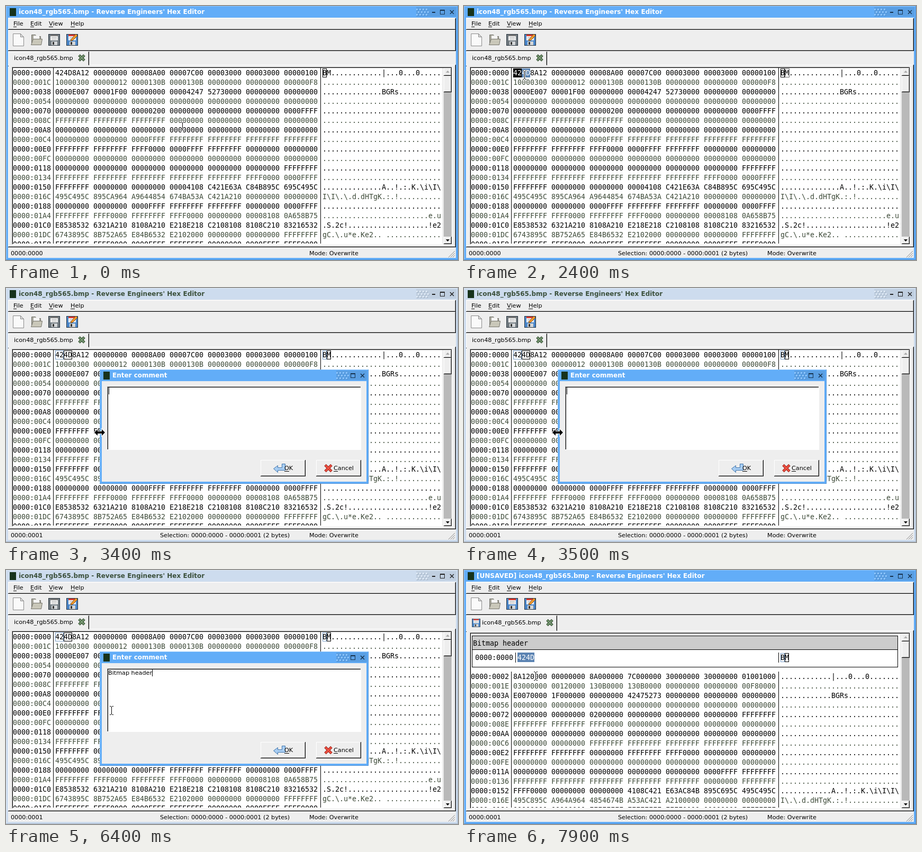
Write an HTML page with a canvas that moves like this. It is 854x480 px and loops after 8 s.

```html
<!DOCTYPE html>
<html lang="en">
<head>
<meta charset="utf-8">
<title>Hex editor</title>
<style>
html, body { margin: 0; width: 100%; height: 100%; overflow: hidden; background: #eee; }
canvas { display: block; }
</style>
</head>
<body>
<canvas id="stage" width="854" height="480"></canvas>
<script>
const g = document.getElementById('stage').getContext('2d');
const SANS = '11.2px "DejaVu Sans", sans-serif';
const BOLD = 'bold 12px "DejaVu Sans", sans-serif';
const MONO = '13.33px "DejaVu Sans Mono", monospace';
const GREY = '#eeeeee', SHADE = '#a5a5a5', SELECT = '#5b83b2';
const ACTIVE = { fill: '#62adf8', light: '#8cc4fb', dark: '#4a8fd6', shade: '#5a9fe3', text: '#fff', ink: '#17324d' };
const PASSIVE = { fill: '#cddcee', light: '#dde8f4', dark: '#a3b3c6', shade: '#c0cfe0', text: '#3b503b', ink: '#222' };

// File contents, "00*6" repeats a byte
const bytes = `
424D8A12 00*6 8A 00*3 7C 00*3 30 00*3 30 00*3 0100
100003 00*4 12 00*2 130B 00*2 130B 00*11 F8
00*2 E007 00*2 1F 00*7 42475273 00*10
00*28
00*10 02 00*15 FFFF
FF*12 00*16
00*28
00*10 FF*18
FF*10 00*4 FF*6 00*8
00*28
00*24 FF*4
FF*22 00*4 FF*2
FF*4 00*10 4108 C421E63A C84B895C 695C495C
495C495C 895CA964 A9644854 674BA53A C421A210 00*8
00*10 FF*10 00*6 FF*2
FF*6 00*2 FF*6 00*8 8108 0A658B75
E8538532 6321A210 8108A210 E218E218 C2108108 8108C210 83216532
6743895C 8B752A65 E84B6532 E21020 00*9 FF*4
FF*6 00*4 FF*6 00*6 FF*4 00*2`
  .replace(/(\w\w)\*(\d+)/g, (_, b, n) => b.repeat(n)).replace(/\s/g, '').match(/../g);

// time, x, y of the pointer
const path = [
  [100, 333, 227], [700, 98, 129], [1600, 98, 129], [1900, 114, 130], [2500, 114, 130],
  [2800, 150, 177], [3200, 177, 273], [3600, 177, 273], [4000, 199, 265], [6400, 199, 265],
  [6800, 510, 340], [7300, 510, 340], [7700, 233, 213], [7800, 118, 178], [7900, 135, 200]
];

function rect(x, y, w, h, c) { g.fillStyle = c; g.fillRect(x, y, w, h); }

function box(x, y, w, h, c) {
  g.strokeStyle = c; g.lineWidth = 1;
  g.strokeRect(x + .5, y + .5, w - 1, h - 1);
}

function poly(points, fill, stroke, width = 1) {
  g.beginPath();
  for (let i = 0; i < points.length; i += 2) g.lineTo(points[i], points[i + 1]);
  if (fill) { g.closePath(); g.fillStyle = fill; g.fill(); }
  if (stroke) { g.strokeStyle = stroke; g.lineWidth = width; g.stroke(); }
}

function text(s, x, y, c = '#000', font = SANS, align = 'left') {
  g.font = font; g.fillStyle = c; g.textAlign = align;
  g.fillText(s, x, y);
}

// One character per 8 pixel cell
function mono(s, x, y, c = '#000') {
  g.font = MONO; g.fillStyle = c; g.textAlign = 'left';
  for (let i = 0; i < s.length; i++) g.fillText(s[i], x + i * 8, y);
}

// "&" marks the underlined letter
function label(s, x, y) {
  const i = s.indexOf('&'), plain = s.replace('&', '');
  text(plain, x, y);
  if (i < 0) return;
  const left = g.measureText(plain.slice(0, i)).width;
  rect(Math.round(x + left), y + 2, Math.round(g.measureText(plain[i]).width), 1, '#000');
}

function cross(x, y, r, c, w) {
  poly([x - r, y - r, x + r, y + r], null, c, w);
  poly([x - r, y + r, x + r, y - r], null, c, w);
}

function raised(x, y, w, h) {
  rect(x, y, w, h, '#000');
  rect(x, y, w - 1, h - 1, '#fff');
  rect(x + 1, y + 1, w - 2, h - 2, SHADE);
  rect(x + 1, y + 1, w - 3, h - 3, GREY);
}

function sunken(x, y, w, h) {
  rect(x, y, w, h, '#fff');
  rect(x, y, w - 1, 1, SHADE); rect(x, y, 1, h - 1, SHADE);
  rect(x + 1, y + 1, w - 2, 1, '#000'); rect(x + 1, y + 1, 1, h - 2, '#000');
}

function groove(x, y, w) { rect(x, y, w, 1, SHADE); rect(x, y + 1, w, 1, '#fff'); }

function frame(x, y, w, h, look, title, minimise) {
  rect(x, y, w, h, look.dark);
  rect(x, y, w - 1, h - 1, look.light);
  rect(x + 1, y + 1, w - 2, h - 2, look.fill);
  rect(x + 4, y + 22, w - 8, h - 26, GREY);

  const right = x + w, mid = y + 11, dots = right - (minimise ? 79 : 61);
  rect(x + 7, mid - 7, 12, 15, '#17331c');
  text(title, x + 24, mid + 4, look.text, BOLD);
  rect(dots, y + 2, right - dots - 3, 18, look.shade);
  for (let i = 0; i < 12; i++) {
    const dx = dots + i % 4 * 6 + (i >> 2) % 2 * 3, dy = mid - 6 + (i >> 2) * 5;
    rect(dx + 1, dy + 1, 3, 3, look.dark);
    rect(dx, dy, 3, 3, look.light);
  }
  if (minimise) rect(right - 49, mid, 6, 2, look.ink);
  box(right - 34, mid - 4, 9, 9, look.ink);
  rect(right - 34, mid - 4, 9, 2, look.ink);
  cross(right - 11.5, mid + .5, 3.5, look.ink, 1.5);
}

function floppy(x, y, s, c) {
  g.save(); g.translate(x, y); g.scale(s, s);
  rect(0, 0, 22, 22, '#26323c');
  rect(1, 1, 20, 20, c);
  rect(4, 1, 14, 11, '#f4f4f4');
  rect(4, 1, 14, 3, c === '#4a86c9' ? '#d7392f' : '#777');
  rect(6, 6, 10, 1, '#aaa'); rect(6, 9, 10, 1, '#aaa');
  rect(6, 14, 11, 7, '#d3d6d8'); rect(8, 15, 3, 5, '#333');
  g.restore();
}

function pencil(x, y) {
  poly([x, y + 10, x + 9, y, x + 12, y + 3, x + 3, y + 12, x - 1, y + 13], '#f39b2c', '#7b4a15');
}

function toolbar(changed) {
  poly([13.5, 52.5, 27.5, 52.5, 33.5, 58.5, 33.5, 75.5, 13.5, 75.5], '#fafafa', '#888');
  poly([27.5, 52.5, 27.5, 58.5, 33.5, 58.5], '#ddd', '#888');
  poly([48.5, 73.5, 48.5, 54.5, 55.5, 54.5, 57.5, 57.5, 65.5, 57.5, 65.5, 73.5], '#aaa99e', '#6f6f68');
  rect(52, 56, 11, 8, '#f4f4f4');
  poly([47.5, 73.5, 51.5, 62.5, 68.5, 62.5, 66.5, 73.5], '#c9c7b9', '#77766d');
  floppy(80, 53, 1, changed ? '#4a86c9' : '#717a80');
  floppy(114, 53, 1, '#4a86c9');
  pencil(123, 53);
}

function hexRows(start, y, count) {
  for (let i = 0; i < count; i++, y += 18) {
    const at = start + i * 28, row = bytes.slice(at, at + 28), c = i % 2 ? '#3d4a38' : '#000';
    const hex = at.toString(16).toUpperCase().padStart(4, '0');
    const chars = row.map(b => {
      const n = parseInt(b, 16);
      return n > 31 && n < 127 ? String.fromCharCode(n) : '.';
    });
    mono('0000:' + hex, 13, y, c);
    mono(row.join('').replace(/.{8}/g, '$& '), 93, y, c);
    mono(chars.join(''), 598, y, c);
  }
}

function scrollbar(y) {
  rect(827, y, 15, 450 - y, '#b9b9b9');
  raised(827, y, 15, 15);
  poly([831, y + 9, 838, y + 9, 834.5, y + 5], '#aaa');
  raised(827, y + 15, 15, 31);
  raised(827, 436, 15, 14);
  poly([831, 441, 838, 441, 834.5, 445], '#000');
}

function byteMarks(t) {
  if (t >= 2500) {
    box(93, 118, 16, 17, '#7c9fc8');
    box(109, 118, 16, 17, '#000');
    box(598, 118, 8, 17, '#7c9fc8');
    box(606, 118, 8, 17, '#000');
    return;
  }
  box(598, 118, 8, 17, '#000');
  if (t >= 1800) {
    rect(109, 118, 16, 17, SELECT);
    mono('4D', 109, 131, '#fff');
    box(606, 118, 9, 17, '#666');
  }
  if (t >= 900) {
    rect(93, 118, 16, 17, '#000');
    mono('42', 93, 131, '#fff');
  }
}

function commentBlock() {
  rect(15, 124, 805, 60, '#000');
  rect(16, 125, 803, 25, '#ccc');
  rect(16, 151, 803, 32, '#fff');
  mono('Bitmap header', 17, 143);
  mono('0000:0000', 21, 170);
  rect(97, 156, 1, 19, '#000'); rect(594, 156, 1, 19, '#000');
  rect(101, 156, 32, 18, SELECT);
  mono('424D', 101, 170, '#fff');
  mono('BM', 598, 170);
  box(598, 157, 8, 17, '#7c9fc8');
  box(606, 157, 8, 17, '#000');
}

function mainWindow(t, active, changed) {
  const title = (changed ? '[UNSAVED] ' : '') + "icon48_rgb565.bmp - Reverse Engineers' Hex Editor";
  frame(0, 0, 854, 480, active ? ACTIVE : PASSIVE, title, true);
  raised(4, 23, 846, 22);
  raised(4, 45, 846, 40);
  label('&File', 14, 37); label('&Edit', 46, 37); label('&View', 81, 37); label('&Help', 122, 37);
  toolbar(changed);

  const d = changed ? 3 : 0, tab = changed ? 175 : 156;
  raised(4, 111 + d, 846, 345 - d);
  raised(4, 86, tab - 3, 28 + d);
  rect(5, 111 + d, tab - 5, 4, GREY);
  rect(tab - 1, 112 + d, 2, 3, GREY);
  if (changed) floppy(15, 92, .72, '#4a86c9');
  text('icon48_rgb565.bmp', changed ? 34 : 15, changed ? 103 : 102);
  cross(tab - 13, changed ? 99.5 : 98, 5, '#2f4a2c', 5);
  cross(tab - 13, changed ? 99.5 : 98, 4.5, '#789973', 2.5);

  sunken(11, 115 + d, 832, 336 - d);
  rect(824, 117 + d, 18, 333 - d, GREY);
  scrollbar(117 + d);
  g.save();
  g.beginPath(); g.rect(13, 117 + d, 811, 332 - d); g.clip();
  const top = changed ? 192 : 117;
  rect(89, top, 1, 340, '#000'); rect(594, top, 1, 340, '#000');
  if (changed) { commentBlock(); hexRows(2, 206, 15); }
  else { hexRows(0, 131, 19); byteMarks(t); }
  g.restore();

  text(t >= 2500 ? '0000:0001' : '0000:0000', 9, 471);
  if (t >= 1800) text('Selection: 0000:0000 - 0000:0001 (2 bytes)', 291, 471);
  text('Mode: Overwrite', 573, 471);
  for (let i = 0; i < 3; i++) poly([836 + i * 4, 475, 848, 463 + i * 4], null, '#888');
}

const items = [
  [141, 'Cu&t', 'Ctrl+X'], [162, '&Copy', 'Ctrl+C'], [183, '&Paste', 'Ctrl+V'],
  [210, 'Copy offset (in hexadecimal)'], [227, 'Copy offset (in decimal)'],
  [252, 'Insert comment here...'], [269, 'Set comment on 2 bytes...'],
  [294, 'Set Highlight', '>'], [311, 'Set data type', '>'], [336, 'Compare...']
];

function menuIcon(i) {
  if (i === 0) {
    poly([121, 134, 128, 144], null, '#777', 2); poly([130, 134, 122, 144], null, '#999', 2);
    g.strokeStyle = '#b5551c'; g.lineWidth = 2;
    for (const x of [121.5, 129.5]) { g.beginPath(); g.arc(x, 146, 2.5, 0, 7); g.stroke(); }
  } else if (i === 1) {
    rect(119, 155, 11, 11, '#888'); rect(120, 156, 9, 9, '#fff');
    rect(122, 158, 12, 12, '#888'); rect(123, 159, 10, 10, '#fff');
    for (let y = 161; y < 168; y += 2) rect(124, y, 8, 1, '#bbb');
  } else {
    rect(118, 176, 14, 15, '#70451c'); rect(119, 177, 12, 13, '#c68a3b');
    rect(121, 179, 11, 11, '#fff'); rect(122, 175, 6, 3, '#777');
  }
}

function menu(pointerY) {
  rect(111, 128, 271, 220, '#333');
  rect(112, 129, 269, 218, '#fff');
  rect(113, 130, 268, 217, GREY);
  items.forEach(([y, name, extra], i) => {
    const half = i < 3 ? 10.5 : 8.5;
    if (pointerY >= y - half && pointerY < y + half)
      rect(113, Math.floor(y - half), 267, half * 2, SELECT);
    label(name, 139, y + 4);
    if (extra === '>') poly([369, y - 4, 369, y + 4, 374, y], '#000');
    else if (extra) text(extra, 371, y + 4, '#000', SANS, 'right');
    if (i < 3) menuIcon(i);
  });
  for (const y of [198, 239, 281, 323]) groove(118, y, 256);
}

function typed(t) {
  const n = t < 4300 ? 0 : t < 4700 ? 1 : t < 5000 ? (t - 4700) / 100 + 2 : t < 5100 ? 4 : (t - 5100) / 100 + 5;
  return 'Bitmap header'.slice(0, n);
}

function dialog(t) {
  frame(177, 154, 508, 216, ACTIVE, 'Enter comment', false);
  sunken(191, 186, 480, 120);
  const s = typed(t);
  text(s, 193, 198);
  rect(Math.round(193.5 + g.measureText(s).width), 188, 1, 13, '#000');
  raised(481, 325, 85, 31);
  raised(586, 325, 85, 31);
  poly([505.5, 341.5, 513.5, 335.5, 513.5, 339.5, 521.5, 339.5, 521.5, 332.5, 527.5, 332.5,
    527.5, 344.5, 513.5, 344.5, 513.5, 348.5], '#a8cdf2', '#3f74ab');
  cross(609, 340.5, 6, '#9c2118', 5);
  cross(609, 340.5, 5.5, '#ef5142', 3);
  label('&OK', 526, 344);
  label('&Cancel', 619, 344);
}

function pointerAt(t) {
  const i = path.findIndex(p => p[0] > t);
  if (i === 0) return path[0].slice(1);
  if (i < 0) return path[path.length - 1].slice(1);
  const [t0, x0, y0] = path[i - 1], [t1, x1, y1] = path[i], k = (t - t0) / (t1 - t0);
  return [Math.round(x0 + (x1 - x0) * k), Math.round(y0 + (y1 - y0) * k)];
}

function pointer(x, y, kind) {
  g.save(); g.translate(x, y);
  if (kind === 'arrow') {
    g.lineJoin = 'round';
    poly([0, 0, 0, 15, 3.5, 12, 6, 17.5, 8.5, 16.5, 6, 11, 11, 11, 0, 0], '#000', '#fff');
  } else if (kind === 'resize') {
    const shape = [-10, 0, -4, -6, -4, -2, 4, -2, 4, -6, 10, 0, 4, 6, 4, 2, -4, 2, -4, 6, -10, 0];
    poly(shape, '#000', '#fff', 2);
    poly(shape, '#000');
  } else {
    for (const [c, w] of [['#fff', 3], ['#000', 1]]) {
      poly([.5, -6, .5, 7], null, c, w);
      poly([-3, -7.5, -1, -7.5, .5, -6, 2, -7.5, 4, -7.5], null, c, w);
      poly([-3, 8.5, -1, 8.5, .5, 7, 2, 8.5, 4, 8.5], null, c, w);
    }
  }
  g.restore();
}

function draw(t) {
  const [x, y] = pointerAt(t);
  const inMenu = t >= 2500 && t < 3400, inDialog = t >= 3400 && t < 7000;
  mainWindow(t, !inDialog, t >= 7300);
  if (inMenu) menu(t < 3200 ? y : 269);
  if (inDialog) dialog(t);
  if (t >= 7000 && t < 7300) rect(177, 154, 508, 216, GREY);
  const inText = x > 191 && x < 671 && y > 186 && y < 306;
  const kind = inMenu ? 'arrow' : !inDialog || inText ? 'text' : x < 182 ? 'resize' : 'arrow';
  pointer(x, y, kind);
}

function tick(now) {
  draw(Math.floor(now % 8000 / 100) * 100);
  requestAnimationFrame(tick);
}
requestAnimationFrame(tick);
</script>
</body>
</html>
```
